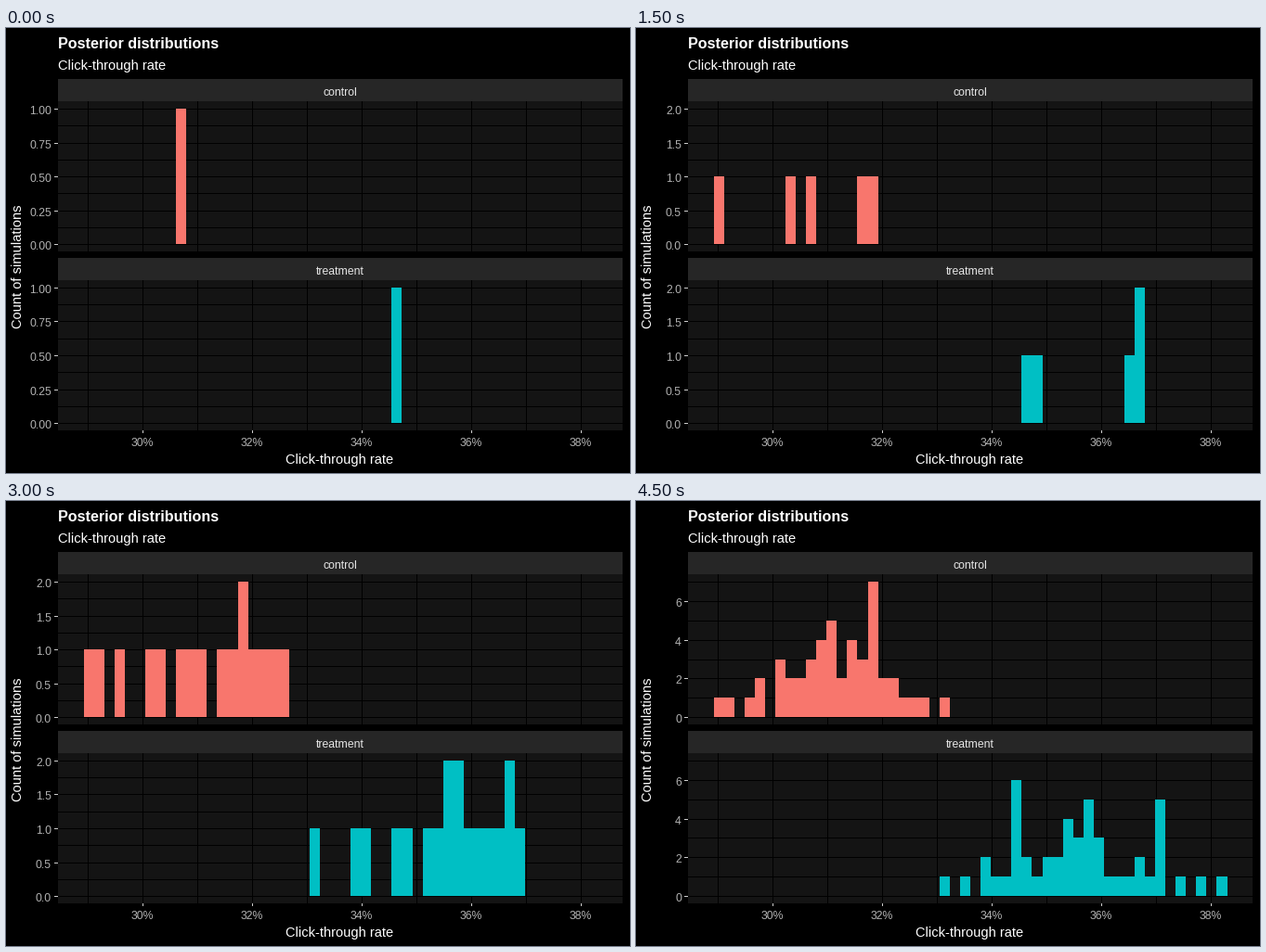
A matplotlib script that plays this animation: 672 px wide and 480 px high, repeating every 5000 ms.

```python
import math
from itertools import chain

import matplotlib.pyplot as plt
import numpy as np
from matplotlib.animation import FuncAnimation
from matplotlib.patches import Rectangle

W, H, DPI = 672, 480, 96
LEFT, RIGHT = 56, 664
BINS, BIN_X, BIN_W = 50, 83.711, 11.056
BAR_H = 146.4

# Bins hit by the new simulations of each step
CONTROL = [
    [9], [7], [15], [0, 14], [13, 17], [1, 10, 11, 18, 19], [3, 6, 15, 16],
    [8, 9, 9, 11, 12, 16],
    [15] * 5 + [4, 6, 10, 10, 11, 11, 13, 14],
    [4, 6, 7, 8, 10, 11, 12, 13, 13, 14, 17, 20, 22],
]
TREATMENT = [
    [30], [], [31], [40, 41, 41], [36, 37, 38], [33, 35, 35],
    [22, 26, 27, 34, 36, 39, 42],
    [32, 32, 34] + [43] * 5,
    [29] * 3 + [26, 33, 34, 35, 36, 36, 37, 45],
    [24, 28, 29, 29, 29, 30, 34, 36, 37, 47, 49],
]
# name, draws, colour, strip top, panel top, panel bottom, zero line
PANELS = [
    ("control", CONTROL, "#F8766D", 55, 79, 241, 233.3),
    ("treatment", TREATMENT, "#00BFC4", 248, 272, 434, 426.2),
]
STEPS = len(CONTROL)

plt.rcParams["font.family"] = "Liberation Sans"
fig = plt.figure(figsize=(W / DPI, H / DPI), dpi=DPI, facecolor="black")
ax = fig.add_axes([0, 0, 1, 1])
ax.set_xlim(0, W)
ax.set_ylim(H, 0)
ax.axis("off")


def px(v):
    return math.floor(v + 0.5)


def box(x0, y0, x1, y1, color, z=1):
    return ax.add_patch(Rectangle((x0, y0), x1 - x0, y1 - y0, facecolor=color,
                                  linewidth=0, antialiased=False, zorder=z))


def label(x, y, text, size, color="white", **kw):
    kw = {"ha": "left", "va": "baseline", **kw}
    return ax.text(x, y, text, fontsize=size * 72 / DPI, color=color, **kw)


def draw_static():
    label(56, 22, "Posterior distributions", 16.1, weight="bold")
    label(56, 45, "Click-through rate", 14.6)
    label(359.5, 470, "Click-through rate", 14.6, ha="center")
    label(20, 257, "Count of simulations", 14.6, rotation=90,
          ha="right", va="center")
    for name, _, _, strip, top, bottom, _ in PANELS:
        box(LEFT, strip, RIGHT, top, "#262626")
        box(LEFT, top, RIGHT, bottom, "#141414")
        label(360, strip + 18, name, 12.2, "#E5E5E5", ha="center")
        for k in range(10):
            x = px(88.35 + 58.95 * k)
            box(x, top, x + 1, bottom, "black", 2)
    for k in range(5):
        x = px(147.3 + 117.9 * k)
        box(x, 434, x + 1, 437, "#CCCCCC")
        label(x, 451, f"{30 + 2 * k}%", 12.2, "#B2B2B2", ha="center")


def counts(draws, step):
    hits = list(chain.from_iterable(draws[:step + 1]))
    return np.bincount(hits, minlength=BINS)


def y_breaks(peak):
    if peak <= 1:
        return 0.25, 2
    if peak <= 2:
        return 0.5, 1
    return (1, 0) if peak <= 5 else (2, 0)


moving = []


def update(step):
    while moving:
        moving.pop().remove()
    tallies = [counts(panel[1], step) for panel in PANELS]
    # both panels share one scale; the last two steps reach the same peak
    peak = max(t.max() for t in tallies)
    gap, digits = y_breaks(peak)
    for (_, _, color, _, _, _, zero), tally in zip(PANELS, tallies):
        for i in range(int(2 * peak / gap) + 1):
            value = i * gap / 2
            y = px(zero - BAR_H * value / peak)
            moving.append(box(LEFT, y, RIGHT, y + 1, "black", 2))
            if i % 2 == 0:
                moving.append(box(52, y, LEFT, y + 1, "#CCCCCC"))
                moving.append(label(49, y + 6, f"{value:.{digits}f}", 12.2,
                                    "#B2B2B2", ha="right"))
        for k in np.flatnonzero(tally):
            x0, x1 = px(BIN_X + BIN_W * k), px(BIN_X + BIN_W * (k + 1))
            y = px(zero - BAR_H * tally[k] / peak)
            moving.append(box(x0, y, x1, px(zero), color, 3))
    return moving


draw_static()
anim = FuncAnimation(fig, update, frames=STEPS, interval=500,
                     init_func=lambda: update(0), repeat=True,
                     repeat_delay=0, blit=False)
plt.show()
```
